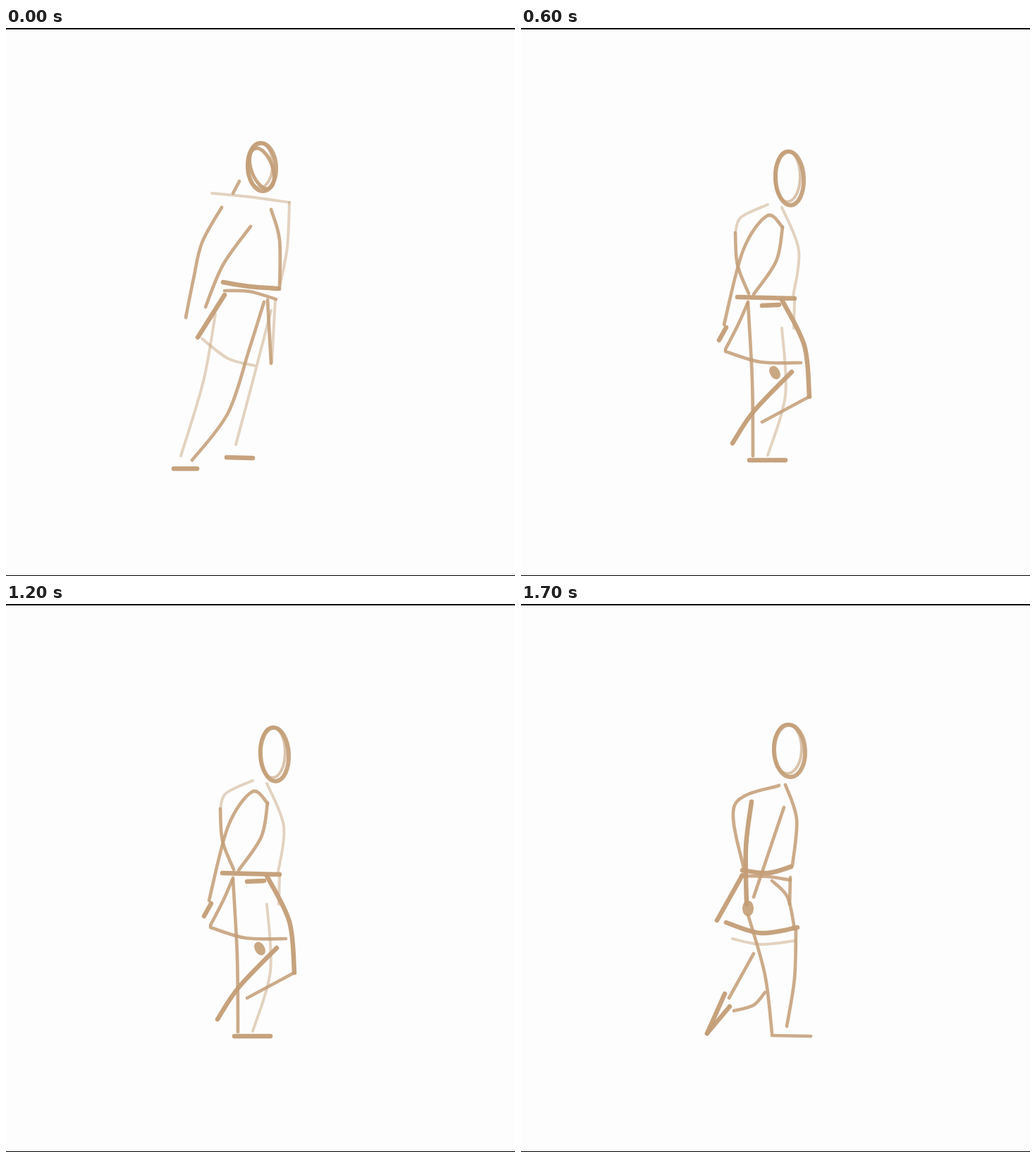
An HTML page with a canvas for the animation above (1.8 s loop, 722x776 px).

```html
<!DOCTYPE html>
<html lang="en">
<head>
<meta charset="utf-8">
<title>Pencil walk</title>
<style>
  html, body { margin: 0; width: 100%; height: 100%; overflow: hidden; background: #fdfdfd; }
  canvas { display: block; }
</style>
</head>
<body>
<canvas width="722" height="776"></canvas>
<script>
const HOLD = 100;
const ctx = document.querySelector('canvas').getContext('2d');

function ink(width, alpha) {
  ctx.lineWidth = width;
  ctx.globalAlpha = alpha;
  ctx.stroke();
}

// A pen draws a smooth curve through the given x, y pairs.
const pen = (width, alpha) => (...xy) => {
  const last = xy.length - 2;
  const at = i => Math.max(0, Math.min(last, i));
  const handle = (i, side, axis) =>
    xy[i + axis] + side * (xy[at(i + 2) + axis] - xy[at(i - 2) + axis]) / 6;
  ctx.beginPath();
  ctx.moveTo(xy[0], xy[1]);
  for (let i = 0; i < last; i += 2) {
    const j = i + 2;
    ctx.bezierCurveTo(handle(i, 1, 0), handle(i, 1, 1),
      handle(j, -1, 0), handle(j, -1, 1), xy[j], xy[j + 1]);
  }
  ink(width, alpha);
};
const bold = pen(6.5, .95), line = pen(4.7, .85), soft = pen(4, .45);

function oval(x, y, rx, ry, tilt = 0, width = 5, alpha = .9) {
  ctx.beginPath();
  ctx.ellipse(x, y, rx, ry, tilt, 0, 7);
  ink(width, alpha);
}

function head(x, y, rx, ry) {
  oval(x, y, rx, ry, -.05, 6);
  oval(x - 3, y - 3, rx - 2, ry - 2, 0, 4, .6);
}

function lean() {
  head(363, 197, 20, 34);
  oval(363, 199, 15, 30, -.35);
  line(331, 217, 322, 234);
  soft(292, 234, 345, 239, 402, 247);
  soft(402, 247, 399, 310, 389, 362);
  line(376, 257, 388, 300, 388, 370);
  bold(308, 360, 345, 366, 386, 369);
  line(310, 372, 345, 373, 383, 384);
  line(306, 254, 278, 304, 266, 355, 255, 410);
  line(347, 281, 308, 335, 283, 395);
  bold(310, 378, 272, 438);
  line(371, 385, 376, 475);
  soft(382, 385, 377, 473);
  line(366, 388, 345, 455, 315, 545, 264, 612);
  soft(297, 405, 280, 500, 248, 606);
  soft(376, 400, 350, 500, 326, 590);
  soft(278, 440, 315, 468, 352, 478);
  bold(238, 624, 271, 624);
  bold(313, 608, 350, 609);
}

function contactBack() {
  head(376, 212, 22, 36);
  line(374, 250, 389, 325, 385, 372);
  line(378, 271, 304, 276);
  line(304, 276, 306, 330, 318, 380);
  line(346, 268, 300, 312, 267, 382);
  line(346, 268, 364, 290, 330, 332, 254, 427);
  line(307, 371, 345, 374, 384, 372);
  bold(328, 380, 274, 436);
  line(318, 382, 350, 392, 382, 394, 386, 445);
  line(282, 432, 335, 483, 376, 462);
  line(386, 440, 402, 520, 402, 598);
  line(316, 428, 360, 510, 380, 590);
  bold(382, 611, 436, 610);
  soft(318, 445, 310, 505, 263, 578);
  line(350, 515, 310, 560, 264, 584);
  bold(259, 577, 271, 603, 289, 608);
}

function contactFront() {
  head(373, 222, 23, 41);
  bold(331, 257, 372, 268, 397, 274);
  line(310, 278, 380, 276);
  line(350, 264, 308, 295, 332, 384);
  soft(313, 285, 322, 340, 340, 385);
  line(366, 425, 345, 360, 334, 286, 372, 282, 375, 415);
  oval(376, 438, 9, 11);
  soft(382, 280, 386, 320, 380, 385);
  line(325, 385, 360, 384, 392, 390);
  line(320, 397, 350, 401, 382, 393);
  line(326, 400, 290, 467);
  line(292, 460, 350, 475, 411, 471);
  soft(296, 475, 350, 486, 411, 472);
  line(384, 395, 411, 472, 433, 595);
  soft(402, 440, 405, 520, 403, 597);
  line(368, 488, 400, 545, 422, 605);
  bold(382, 609, 468, 609);
  line(322, 485, 305, 535, 275, 575);
  line(372, 478, 345, 540, 286, 580);
  bold(269, 567, 280, 602);
  line(283, 610, 304, 613);
}

function down() {
  head(381, 208, 22, 37);
  line(366, 257, 303, 285, 316, 375);
  line(375, 256, 391, 305, 385, 370);
  bold(327, 280, 319, 345, 320, 425);
  line(373, 288, 330, 415);
  oval(322, 431, 4, 7, 0, 8);
  bold(314, 384, 278, 448);
  bold(314, 377, 350, 381, 383, 372);
  line(312, 385, 350, 386, 382, 391);
  line(382, 387, 381, 425);
  line(356, 392, 378, 415, 388, 460);
  bold(291, 451, 340, 466, 392, 458);
  soft(300, 474, 340, 482, 388, 477);
  line(322, 440, 346, 525, 356, 608);
  line(390, 460, 388, 530, 377, 598);
  line(356, 611, 411, 612);
  line(330, 495, 295, 558);
  line(346, 550, 330, 568, 302, 576);
  bold(289, 552, 264, 608);
  bold(296, 570, 264, 608);
}

function pass() {
  head(381, 213, 20, 38);
  soft(350, 250, 312, 268, 304, 290);
  line(304, 290, 307, 335, 323, 376);
  soft(370, 254, 394, 315, 386, 380);
  line(330, 377, 362, 330, 371, 282);
  line(371, 282, 349, 266, 315, 315, 288, 420);
  bold(291, 424, 281, 442);
  bold(307, 381, 388, 383);
  bold(342, 393, 366, 392);
  soft(388, 384, 387, 425);
  line(322, 388, 308, 420, 290, 455);
  line(290, 458, 340, 473, 397, 474);
  bold(370, 385, 402, 450, 409, 522);
  line(409, 522, 342, 558);
  bold(384, 487, 330, 543, 300, 588);
  oval(360, 488, 3, 6, -.5, 8);
  line(322, 390, 328, 500, 329, 606);
  soft(370, 425, 375, 520, 350, 605);
  bold(324, 612, 375, 612);
}

function torso() {
  head(381, 219, 22, 37);
  soft(361, 238, 340, 260);
  line(384, 270, 345, 254, 318, 280, 309, 312);
  soft(364, 258, 399, 320, 388, 388);
  line(320, 388, 355, 391, 390, 388);
  soft(330, 402, 384, 398);
  line(322, 390, 288, 462, 300, 481, 380, 477);
  soft(288, 458, 350, 472, 411, 466);
}

function armFront() {
  line(309, 312, 324, 388);
  soft(318, 290, 327, 388);
  bold(357, 273, 328, 291);
  bold(328, 291, 340, 390);
  soft(376, 295, 365, 360, 361, 425);
  oval(360, 440, 10, 12);
}

function armBack() {
  soft(306, 315, 280, 355, 264, 402);
  line(368, 300, 325, 355, 266, 408);
  line(322, 355, 324, 388);
  bold(268, 402, 246, 430);
}

function lift() {
  line(378, 400, 420, 490, 364, 556);
  line(362, 470, 388, 500, 346, 552);
  line(346, 554, 362, 560, 352, 596, 346, 554);
  line(318, 484, 304, 605);
  line(368, 478, 322, 605);
  bold(295, 613, 350, 612);
}

function plant() {
  line(315, 484, 290, 550, 280, 605);
  line(362, 478, 330, 550, 293, 603);
  bold(264, 614, 322, 612);
  line(362, 558, 382, 562, 395, 598, 362, 558);
}

function softKnee() {
  line(382, 402, 412, 445, 428, 485, 390, 552);
  bold(362, 464, 397, 509);
  soft(390, 517, 380, 545, 358, 557);
}

function sharpKnee() {
  line(382, 402, 411, 455, 436, 487, 388, 556);
  bold(333, 462, 372, 484, 396, 510);
  line(395, 510, 372, 556);
}

function heel() {
  line(384, 400, 428, 490, 456, 585);
  line(368, 480, 436, 596);
  bold(438, 598, 450, 606, 486, 588);
  line(318, 484, 272, 588);
  line(366, 478, 288, 592);
  bold(264, 588, 274, 608, 308, 613);
}

const stride = (arm, knee) =>
  [[torso, arm, lift], [torso, arm, plant, knee], [torso, arm, heel]];
const backStep = [...stride(armBack, sharpKnee), [contactBack], [down]];
const frontStep = [...stride(armFront, softKnee), [contactFront], [down]];
const cycle = [[lean], ...backStep, [pass], ...frontStep, [pass], ...backStep];

function draw() {
  const pose = cycle[Math.floor(performance.now() / HOLD) % cycle.length];
  ctx.globalAlpha = 1;
  ctx.fillRect(0, 0, 722, 776);
  ctx.clearRect(0, 1.5, 722, 773);
  pose.forEach(part => part());
  requestAnimationFrame(draw);
}

ctx.lineCap = ctx.lineJoin = 'round';
ctx.strokeStyle = '#c39d76';
draw();
</script>
</body>
</html>
```
